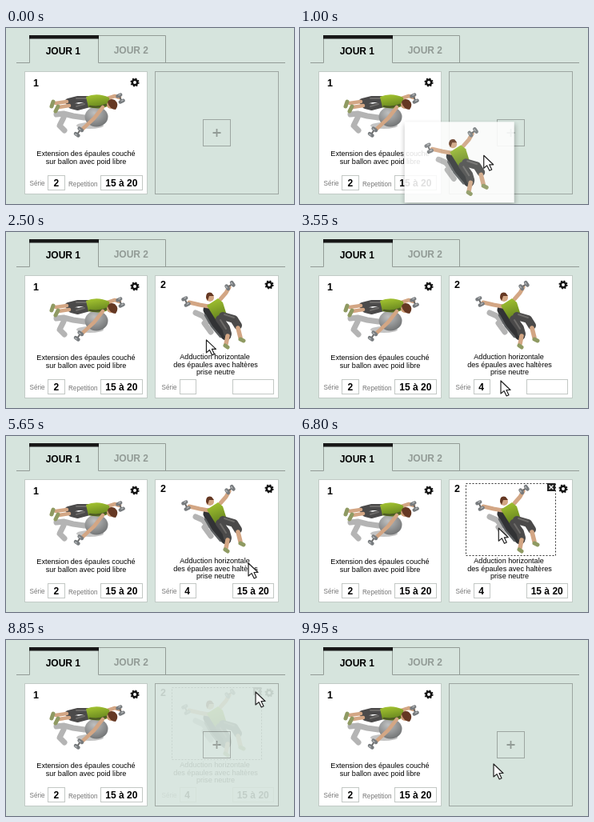
These frames come from a looping animation (360x220 px, 10 s). An HTML page:

```html
<!DOCTYPE html>
<html lang="fr">
<head>
<meta charset="utf-8">
<title>Programme</title>
<style>
  html, body { margin: 0; width: 100%; height: 100%; overflow: hidden; background: #d6e4dd; }
  svg { display: block; width: 360px; height: 220px; font-family: "Liberation Sans", Arial, sans-serif; }
  .tab { font-weight: bold; font-size: 12px; }
  .num { font-weight: bold; font-size: 12.5px; }
  .name { font-size: 9.1px; text-anchor: middle; }
  .label { font-size: 8.15px; fill: #777; }
  .value { font-weight: bold; font-size: 12px; }
  .field { fill: #fff; stroke: #c3c8c5; }
  .card { fill: #fff; stroke: #c2cbc6; }
  .slot { fill: none; stroke: #9da6a1; }
  .limb { fill: none; stroke-linecap: round; stroke-linejoin: round; }
  .skin { stroke: #d3a684; }
  .dark { stroke: #4b4a4a; }
  .fold { stroke: #6d6b69; }
  .shade { stroke: #b4b4b4; }
  .shoe { stroke: #8f9a62; }
</style>
</head>
<body>
<svg viewBox="0 0 360 220">
  <defs>
    <filter id="soft" x="-20%" y="-20%" width="140%" height="140%"><feGaussianBlur stdDeviation="3.2"/></filter>
    <radialGradient id="ballFill" cx=".4" cy=".3" r=".75">
      <stop offset="0" stop-color="#bfc0c0"/><stop offset="1" stop-color="#6f7172"/>
    </radialGradient>
    <linearGradient id="shirt" x2=".3" y2="1">
      <stop offset="0" stop-color="#a9c932"/><stop offset="1" stop-color="#66851f"/>
    </linearGradient>
    <g id="gear">
      <circle r="3.2" fill="none" stroke="#111" stroke-width="2.5"/>
      <circle r="4.7" fill="none" stroke="#111" stroke-width="1.8" stroke-dasharray="1.85 1.84"/>
    </g>
    <g id="bell">
      <path d="M-4 0H4" stroke="#666" stroke-width="2"/>
      <path d="M-4-2V2M4-2V2" class="limb" stroke="#777b7e" stroke-width="4.6"/>
      <path d="M-4.6-2V0M3.4-2V0" class="limb" stroke="#b5b8ba" stroke-width="1.4"/>
    </g>
    <g id="ballExercise">
      <path class="limb shade" stroke-width="7" d="M63 108L72 107 84 110 98 112M72 112L67 122 73 128"/>
      <ellipse cx="105" cy="122" rx="17" ry="4" fill="#c4c4c4"/>
      <path class="limb skin" stroke-width="4.5" d="M127 88L136 85 142 87"/>
      <use href="#bell" transform="translate(143 88) rotate(65)"/>
      <ellipse cx="113" cy="111" rx="14.5" ry="12.5" fill="url(#ballFill)"/>
      <path class="limb dark" stroke-width="8" d="M105 89L90 89 78 92M105 95L90 99 82 97"/>
      <path class="limb fold" stroke-width="2" d="M102 88L88 88M98 95L88 98"/>
      <path class="limb skin" stroke-width="4.5" d="M76 92L62 94M79 97L66 99"/>
      <path class="limb shoe" stroke-width="5" d="M59 92L57 98M65 98L62 104"/>
      <path d="M100 86Q114 80 129 87L130 96Q121 103 103 99Z" fill="url(#shirt)"/>
      <path class="limb" stroke="#4d5a25" stroke-width="2.5" d="M105 98Q116 100 125 96"/>
      <path class="limb skin" stroke-width="4.5" d="M121 99L110 113 96 126"/>
      <circle cx="131" cy="96" r="5" fill="#c99874"/>
      <path d="M127 93Q129 87 136 90 142 95 137 102 130 102 127 93Z" fill="#653823"/>
      <use href="#bell" transform="translate(91 130) rotate(-55)"/>
    </g>
    <g id="benchExercise">
      <path class="limb shade" stroke-width="7" d="M-26-3L-17 1 -11 8M-15 10L-7 21"/>
      <path class="limb" stroke="#323335" stroke-width="13" d="M-10-7L-2 9 12 25"/>
      <path class="limb" stroke="#5d6062" stroke-width="2.5" d="M-14 0L-6 14 5 27"/>
      <path class="limb skin" stroke-width="5" d="M-10-11L-21-13 -34-16M5-20L12-28 16-35"/>
      <use href="#bell" transform="translate(-38 -17) rotate(65)"/>
      <use href="#bell" transform="translate(17 -37) rotate(-35)"/>
      <circle cx="-8" cy="-22" r="5" fill="#d3a684"/>
      <path d="M-13-22Q-13-30-6-28L-3-24-9-24-11-18Z" fill="#653823"/>
      <path d="M-12-12L2-21 8-16 13 0 0 7Z" fill="url(#shirt)"/>
      <path class="limb dark" stroke-width="10" d="M8 1L22 5 27 13M4 5L12 16 14 23"/>
      <path class="limb fold" stroke-width="2" d="M10-1L22 3M5 6L12 17"/>
      <path class="limb skin" stroke-width="5.5" d="M27 16L30 28M14 26L12 36"/>
      <path class="limb shoe" stroke-width="5" d="M30 30L34 32M11 38L14 40"/>
    </g>
  </defs>

  <rect width="360" height="220" fill="#d6e4dd"/>
  <path d="M13 43.5H29.5V10M115.5 10V43.5H349M116 9.5H199.5V43" fill="none" stroke="#929b96"/>
  <rect x="29" y="9" width="87" height="4.5" fill="#181818"/>
  <text class="tab" x="49.7" y="33">JOUR 1</text>
  <text class="tab" x="134.7" y="31.5" fill="#929b96">JOUR 2</text>

  <rect class="card" x="23.5" y="54.5" width="153" height="153"/>
  <text class="num" x="34" y="73.4">1</text>
  <use href="#gear" x="161" y="68"/>
  <use href="#ballExercise"/>
  <text class="name" x="100" y="159.7">Extension des épaules couché</text>
  <text class="name" x="100" y="170">sur ballon avec poid libre</text>
  <text class="label" x="29.5" y="197">Série</text>
  <rect class="field" x="52.5" y="184.5" width="21" height="18"/>
  <text class="value" x="59.5" y="198">2</text>
  <text class="label" x="78" y="198">Repetition</text>
  <rect class="field" x="118.5" y="184.5" width="52" height="18"/>
  <text class="value" x="124.3" y="197.7">15 à 20</text>

  <rect class="slot" x="186.5" y="54.5" width="154" height="153"/>
  <rect class="slot" x="246.5" y="114.5" width="34" height="33"/>
  <path d="M258.5 131H268.5M263.5 126V136" stroke="#929b96" stroke-width="1.8"/>

  <g id="newCard">
    <rect class="card" x="186.5" y="54.5" width="154" height="153"/>
    <g id="content">
      <text class="num" x="193" y="70">2</text>
      <use href="#gear" x="329" y="66"/>
      <use href="#benchExercise" x="263" y="104"/>
      <text class="name" x="261" y="159">Adduction horizontale</text>
      <text class="name" x="262" y="168.5">des épaules avec haltères</text>
      <text class="name" x="262" y="178">prise neutre</text>
      <text class="label" x="194.5" y="197">Série</text>
      <rect class="field" x="217.5" y="184.5" width="20" height="18"/>
      <text class="value" id="sets" x="223.3" y="198">4</text>
      <rect class="field" x="283.5" y="184.5" width="51" height="18"/>
      <path id="caret" d="M285.5 187V200" stroke="#333"/>
      <text class="value" id="reps" x="288.7" y="197.7"></text>
    </g>
    <g id="hover">
      <rect x="207.5" y="59.5" width="112" height="90" fill="none" stroke="#333" stroke-dasharray="2 2"/>
      <rect x="309" y="59" width="10" height="10" fill="#222"/>
      <path d="M311.5 61.5L316.5 66.5M316.5 61.5L311.5 66.5" stroke="#fff" stroke-width="1.4"/>
    </g>
  </g>

  <g id="ghost">
    <rect x="0" y="3" width="138" height="101" fill="#000" opacity=".32" filter="url(#soft)"/>
    <rect width="137" height="101" fill="#fff"/>
    <use href="#benchExercise" x="68.5" y="50"/>
  </g>

  <path id="cursor" d="M0 0V16L4 12.6 7.2 19 10 17.7 7 11.5H12Z" fill="#fff" stroke="#222" stroke-width="1.2" stroke-linejoin="round"/>
</svg>
<script>
const LOOP = 10000, STEP = 50;
const el = id => document.getElementById(id);
const parts = Object.fromEntries(
  ["newCard", "content", "sets", "caret", "reps", "hover", "ghost", "cursor"].map(id => [id, el(id)]));

const linear = p => p;
const easeIn = p => p * p;
const easeOut = p => 1 - (1 - p) ** 2;
const easeInOut = p => p < .5 ? 2 * p * p : 1 - 2 * (1 - p) ** 2;

// time, x, y, easing towards this point
const cursorPath = [
  [400, 181, 227],
  [1450, 258, 120, easeInOut],
  [2250, 258, 120, linear],
  [3000, 224, 187, easeInOut],
  [3250, 225, 187, linear],
  [3550, 251, 186, easeIn],
  [4400, 302, 186, easeOut],
  [5200, 302, 186, linear],
  [5650, 303, 159, easeIn],
  [6250, 286, 124, linear],
  [7300, 217, 108, easeInOut],
  [8100, 293, 91, easeInOut],
  [8400, 312, 65, easeInOut],
  [9300, 312, 65, linear],
  [9950, 242, 155, easeInOut]
];
const typing = [[4950, "15 à 20"], [4700, "15 à"], [4650, "15"], [4550, "1"], [0, ""]];

const ramp = (t, from, to) => Math.min(1, Math.max(0, (t - from) / (to - from)));
const between = (t, from, to) => t >= from && t < to;
const show = (node, visible) => node.setAttribute("visibility", visible ? "visible" : "hidden");
const fade = (node, value) => node.setAttribute("opacity", value);
const place = (node, x, y) => node.setAttribute("transform", `translate(${x} ${y})`);

function pointAt(path, t) {
  const i = path.findIndex(key => key[0] > t);
  if (i < 0) return path[path.length - 1].slice(1, 3);
  if (i === 0) return path[0].slice(1, 3);
  const [t0, x0, y0] = path[i - 1], [t1, x1, y1, ease] = path[i];
  const p = ease(ramp(t, t0, t1));
  return [x0 + (x1 - x0) * p, y0 + (y1 - y0) * p];
}

function render(t) {
  const [x, y] = pointAt(cursorPath, t);
  place(parts.cursor, x, y);
  show(parts.cursor, t >= 400);

  place(parts.ghost, x - 99, y - 42);
  fade(parts.ghost, between(t, 400, 2100) ? .88 * (1 - ramp(t, 1800, 2100)) : 0);

  fade(parts.newCard, t < 1450 ? 0 : 1 - ramp(t, 8350, 8900));
  fade(parts.content, ramp(t, 1800, 2100));
  fade(parts.sets, t >= 3000 ? 1 : 0);
  fade(parts.caret, between(t, 4400, 5250) ? 1 : 0);
  fade(parts.hover, t >= 5850 ? 1 : 0);
  parts.reps.textContent = typing.find(([start]) => t >= start)[1];
}

const begin = performance.now();
function tick() {
  const t = (performance.now() - begin) % LOOP;
  render(Math.floor(t / STEP) * STEP);
  requestAnimationFrame(tick);
}
render(0);
requestAnimationFrame(tick);
</script>
</body>
</html>
```
